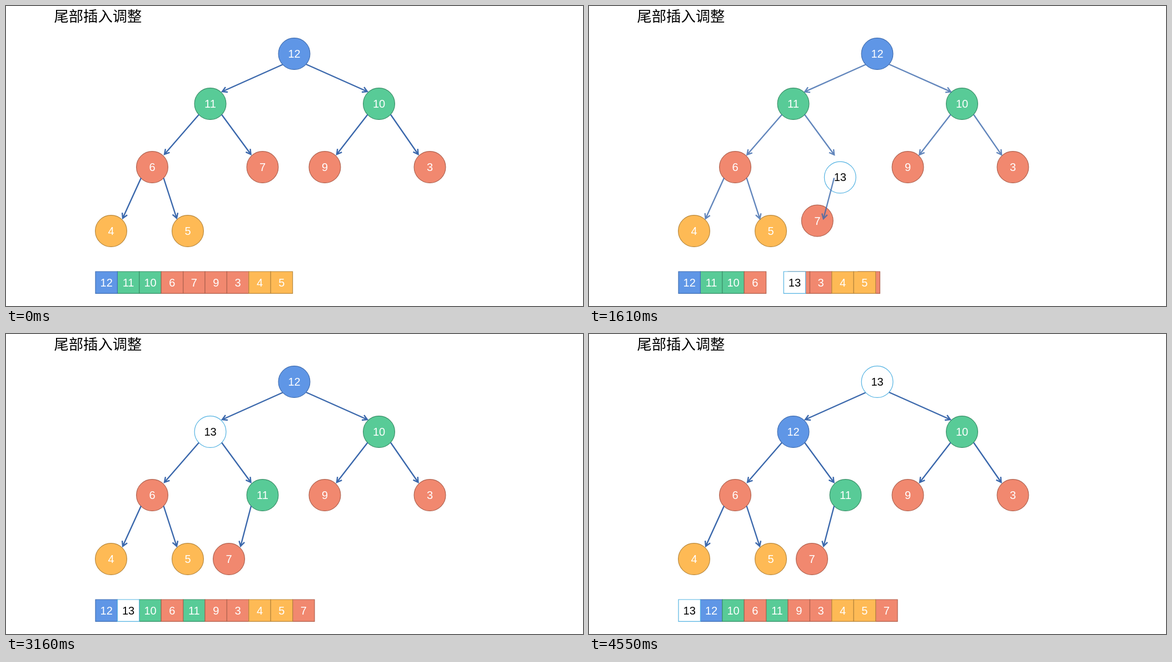
An HTML page with a canvas for the animation above (4720 ms loop, 1038 by 540 pixels).

```html
<!DOCTYPE html>
<html lang="zh">
<head>
<meta charset="utf-8">
<style>
  html, body { margin: 0; width: 100%; height: 100%; overflow: hidden; background: #fff; }
  canvas { display: block; }
</style>
</head>
<body>
<canvas id="stage" width="1038" height="540"></canvas>
<script>
const ctx = document.getElementById('stage').getContext('2d');
const LOOP = 4720, INSERT_AT = 230, MOVE_TIME = 970;

// [fill, outline, text]
const BLUE = ['#5f96e6', '#416fb3', '#fff'];
const GREEN = ['#58cb97', '#3b9069', '#fff'];
const RED = ['#f1886f', '#b16350', '#fff'];
const ORANGE = ['#feba55', '#b9893f', '#fff'];
const WHITE = ['#fff', '#55b3e2', '#000'];

const values = [12, 11, 10, 6, 7, 9, 3, 4, 5, 13];
const colors = [BLUE, GREEN, GREEN, RED, RED, RED, RED, ORANGE, ORANGE, WHITE];
const slots = [
  [518.5, 86], [367.5, 176], [671, 176], [263, 290], [461.5, 290],
  [573.5, 290], [762.5, 290], [189, 405], [327, 405], [401, 405]
].map(([x, y], i) => ({ x, y, cell: 180.7 + 39.4 * i }));

const rootArrow = [497.5, 105.5, 389, 154];
const arrows = [
  [540, 105, 650, 154], [347, 195.5, 285, 267], [388, 195.5, 440.5, 267],
  [650.5, 195.5, 595, 267], [692, 195.5, 741.5, 267],
  [243, 309.5, 210, 382], [283.5, 309.5, 307, 382]
];
const newArrow = [441, 309.5, 422, 382];

// The new item climbs this path; each swap is shown in discrete steps.
const path = [9, 4, 1, 0];
const swaps = [
  { begin: 915, first: 1010, last: 1910, steps: 12 },
  { begin: 2166, first: 2230, last: 3160, steps: 12 },
  { begin: 3472, first: 3560, last: 4540, steps: 13 }
];

const ease = u => u < .5 ? 2 * u * u : 1 - 2 * (1 - u) ** 2;
const lerp = (a, b, p) => a + (b - a) * p;
const between = (a, b, p) => ({
  x: lerp(a.x, b.x, p), y: lerp(a.y, b.y, p), cell: lerp(a.cell, b.cell, p)
});

function swapPhase({ begin, first, last, steps }, t) {
  if (t < first) return 0;
  if (t >= last) return 1;
  const step = (last - first) / steps;
  const held = first + Math.floor((t - first) / step) * step;
  return Math.min(1, (held - begin) / MOVE_TIME);
}

function label(text, x, y, color) {
  ctx.font = '20px "Liberation Sans", Arial, sans-serif';
  ctx.textAlign = 'center';
  ctx.fillStyle = color;
  ctx.fillText(text, x, y + 7);
}

function paint(i) {
  [ctx.fillStyle, ctx.strokeStyle] = colors[i];
  ctx.lineWidth = 1.2;
  ctx.fill();
  ctx.stroke();
}

function drawNode(i, { x, y }) {
  ctx.beginPath();
  ctx.arc(x, y, 28.4, 0, 7);
  paint(i);
  label(values[i], x, y, colors[i][2]);
}

function drawCell(i, { cell }) {
  ctx.beginPath();
  ctx.rect(cell - 19.7, 478, 39.4, 39.4);
  paint(i);
  label(values[i], cell, 497.7, colors[i][2]);
}

function drawArrow([x1, y1, x2, y2], fade) {
  const angle = Math.atan2(y2 - y1, x2 - x1);
  const tipX = x2 + Math.cos(angle) * (fade ? 1 : 0);
  const tipY = y2 + Math.sin(angle) * (fade ? 1 : 0);
  const barb = side => [
    tipX - 10 * Math.cos(angle + side * .52),
    tipY - 10 * Math.sin(angle + side * .52)
  ];
  ctx.beginPath();
  ctx.moveTo(x1, y1);
  ctx.lineTo(tipX, tipY);
  ctx.moveTo(...barb(-1));
  ctx.lineTo(tipX, tipY);
  ctx.lineTo(...barb(1));
  ctx.globalAlpha = 1 - .2 * fade;
  ctx.strokeStyle = '#3b68ac';
  ctx.lineWidth = 2.4;
  ctx.stroke();
  ctx.globalAlpha = 1;
}

function render(t) {
  ctx.fillStyle = '#fff';
  ctx.fillRect(0, 0, 1038, 540);
  ctx.font = '26.3px "Noto Sans CJK SC", "Noto Sans CJK", sans-serif';
  ctx.textAlign = 'left';
  ctx.fillStyle = '#000';
  ctx.fillText('尾部插入调整', 86.5, 27.5);

  const inserted = t >= INSERT_AT;
  const places = slots.slice();
  let fade = 0;
  swaps.forEach((swap, k) => {
    if (t < swap.first) return;
    const u = swapPhase(swap, t), p = ease(u);
    const low = slots[path[k]], high = slots[path[k + 1]];
    places[9] = between(low, high, p);
    places[path[k + 1]] = between(high, low, p);
    if (t < swap.last) fade = Math.min(1, u * 3);
  });

  // Swapped-out cells slide underneath the resting ones; the new item is on top.
  const movers = path.slice(1);
  const order = [...movers, ...values.keys()].filter((v, i, all) => all.indexOf(v) === i);
  const visible = order.filter(i => i < 9 || inserted);

  drawArrow(rootArrow, fade);
  visible.forEach(i => drawNode(i, places[i]));
  arrows.forEach(a => drawArrow(a, fade));
  if (inserted) drawArrow(newArrow, fade);
  visible.forEach(i => drawCell(i, places[i]));
}

const start = performance.now();
function tick() {
  render((performance.now() - start) % LOOP);
  requestAnimationFrame(tick);
}
tick();
</script>
</body>
</html>
```
